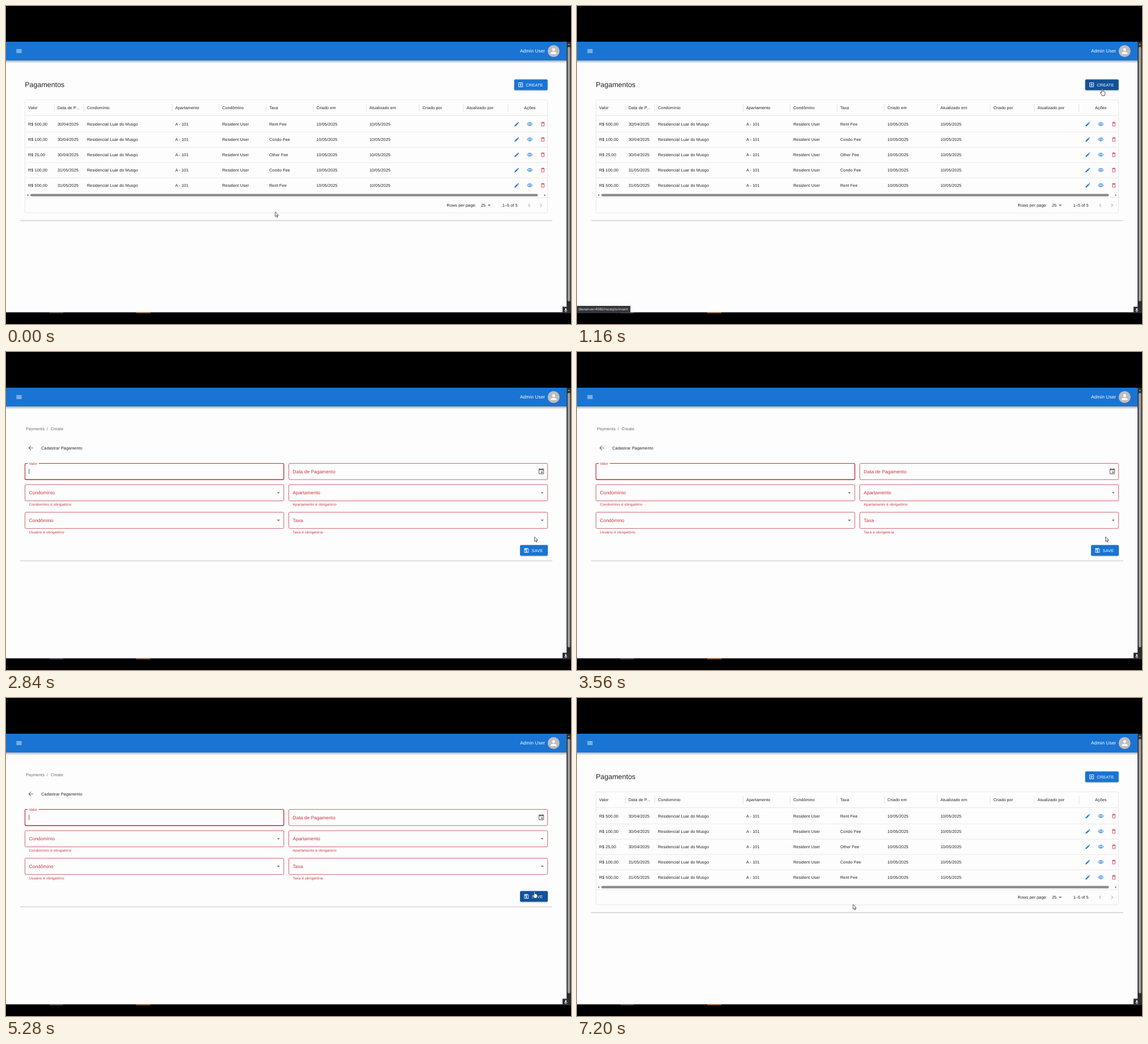
An HTML page for the animation above (7280 ms loop, 998 by 561 pixels).

```html
<!DOCTYPE html>
<html lang="pt">
<head>
<meta charset="utf-8">
<title>Pagamentos</title>
<style>
html, body { margin: 0; width: 100%; height: 100%; overflow: hidden; background: #000; }
svg { display: block; width: 100vw; height: 100vh; }
text { font-family: "Liberation Sans", Arial, sans-serif; white-space: pre; text-rendering: geometricPrecision; }
</style>
</head>
<body>
<svg id="stage" viewBox="0 0 998 561"></svg>
<script>
const LOOP = 7280;
const BLUE = '#1974d3', BLUE_DARK = '#11529a', RED = '#c62f35', INK = '#232323', GREY = '#6b6b6b';
const BODY = 7.28, LARGE = 8.32, SMALL = 6.24;

// Moments of the story, in ms
const OPEN_FORM = 1560, SUBMIT = 2840, BLUR = 6480, BACK = 6720;
const LINK_ON = 880, LINK_OFF = 1720;

const ICONS = {
  menu: 'M3 18h18v-2H3v2zm0-5h18v-2H3v2zm0-7v2h18V6H3z',
  person: 'M12 12c2.2 0 4-1.8 4-4s-1.8-4-4-4-4 1.8-4 4 1.8 4 4 4zm0 2c-2.7 0-8 1.3-8 4v2h16v-2c0-2.7-5.3-4-8-4z',
  add: 'M19 3H5a2 2 0 0 0-2 2v14a2 2 0 0 0 2 2h14a2 2 0 0 0 2-2V5a2 2 0 0 0-2-2zm0 16H5V5h14v14zm-8-2h2v-4h4v-2h-4V7h-2v4H7v2h4z',
  save: 'M17 3H5a2 2 0 0 0-2 2v14a2 2 0 0 0 2 2h14a2 2 0 0 0 2-2V7l-4-4zm2 16H5V5h11.2L19 7.8V19zm-7-7a3 3 0 1 0 0 6 3 3 0 0 0 0-6zM6 6h9v4H6z',
  edit: 'M3 17.2V21h3.8L17.8 9.9l-3.7-3.7L3 17.2zM20.7 7a1 1 0 0 0 0-1.4l-2.3-2.3a1 1 0 0 0-1.4 0l-1.9 1.8 3.8 3.8L20.7 7z',
  view: 'M12 4C7 4 2.7 7.1 1 11.5 2.7 15.9 7 19 12 19s9.3-3.1 11-7.5C21.3 7.1 17 4 12 4zm0 2c3.8 0 7.2 2.1 8.8 5.5-1.6 3.4-5 5.5-8.8 5.5s-7.2-2.1-8.8-5.5C4.8 8.1 8.2 6 12 6zm0 1a4.5 4.5 0 1 0 0 9 4.5 4.5 0 0 0 0-9zm0 2a2.5 2.5 0 1 1 0 5 2.5 2.5 0 0 1 0-5z',
  remove: 'M6 19a2 2 0 0 0 2 2h8a2 2 0 0 0 2-2V7H6v12zM8 9h8v10H8V9zm7.5-5l-1-1h-5l-1 1H5v2h14V4z',
  date: 'M17 12h-5v5h5v-5zM16 1v2H8V1H6v2H5a2 2 0 0 0-2 2v14a2 2 0 0 0 2 2h14a2 2 0 0 0 2-2V5a2 2 0 0 0-2-2h-1V1h-2zm3 18H5V8h14v11z',
  back: 'M20 11H7.8l5.6-5.6L12 4l-8 8 8 8 1.4-1.4L7.8 13H20z',
  prev: 'M15.4 7.4 14 6l-6 6 6 6 1.4-1.4-4.6-4.6z',
  next: 'M10 6 8.6 7.4l4.6 4.6-4.6 4.6L10 18l6-6z',
  down: 'M7 10l5 5 5-5z',
  mic: 'M12 14a3 3 0 0 0 3-3V5a3 3 0 0 0-6 0v6a3 3 0 0 0 3 3zm5-3a5 5 0 0 1-10 0H5a7 7 0 0 0 6 6.9V21h2v-3.1a7 7 0 0 0 6-6.9z'
};

const rect = (x, y, w, h, fill, extra = '') =>
  `<rect x="${x}" y="${y}" width="${w}" height="${h}" fill="${fill}" ${extra}/>`;
const path = (d, extra) => `<path d="${d}" ${extra}/>`;
const line = (d, color, width = 1) => path(d, `fill="none" stroke="${color}" stroke-width="${width}"`);
const icon = (name, cx, cy, fill, size = 12.48) =>
  path(ICONS[name], `fill="${fill}" fill-rule="evenodd" transform="translate(${cx - size / 2} ${cy - size / 2}) scale(${size / 24})"`);
// Text is placed by its left edge and vertical centre
const label = (x, cy, str, size = BODY, fill = INK, spacing = 0.078, extra = '') =>
  `<text x="${x}" y="${cy + size * 0.36}" font-size="${size}" fill="${fill}" letter-spacing="${spacing}" ${extra}>${str}</text>`;
const group = (id, body) => `<g id="${id}">${body}</g>`;

function button(id, x, y, w, name, str) {
  return rect(x, y + 1, w, 19.2, '#000', 'rx="2" opacity=".2" filter="url(#soft)"') +
    rect(x, y, w, 19.2, BLUE, `id="${id}" rx="2"`) +
    icon(name, x + 11.3, y + 9.6, '#fff', 10.4) +
    label(x + 20.6, y + 9.6, str, BODY, '#fff', 0.2);
}

const cardEdge = y => rect(25, y, 940, 1, '#c2c2c4') + rect(26, y + 1, 938, 1, '#e9e9eb');

function shell() {
  return rect(0, 63, 990.5, 477.5, '#fdfdfe') +
    rect(0, 96, 990.5, 5, 'url(#barShade)') +
    rect(0, 63, 990.5, 33, BLUE) +
    icon('menu', 23, 79.5, '#fff') +
    label(908, 79, 'Admin User', LARGE, '#fff') +
    '<circle cx="967.3" cy="79.5" r="10.5" fill="#bdbdbd"/>' + icon('person', 967.3, 79.5, '#fff', 15.6) +
    rect(990.5, 63, 7.5, 478.5, '#2b2b2b') + rect(992, 72, 4.6, 449, '#9d9d9f', 'rx="2.3"') +
    path('M992.2 68.8h4l-2-2.8z', 'fill="#9d9d9f"') +
    rect(0, 540.4, 998, 1.6, '#292936') +
    rect(77, 540.6, 24, 1.2, '#77777c') + rect(230, 540.6, 25, 1.2, '#d9843f') +
    rect(983, 530.5, 11, 11, '#303034') + icon('mic', 988.8, 536.8, '#eee', 9);
}

function listView() {
  const columns = [[39, 'Valor'], [91, 'Data de P...'], [143, 'Condomínio'], [299, 'Apartamento'],
    [382, 'Condômino'], [465, 'Taxa'], [548.3, 'Criado em'], [642, 'Atualizado em'],
    [735.5, 'Criado por'], [813.5, 'Atualizado por'], [915, 'Ações']];
  const rows = [['500,00', '30/04/2025', 'Rent'], ['100,00', '30/04/2025', 'Condo'], ['25,00', '30/04/2025', 'Other'],
    ['100,00', '31/05/2025', 'Condo'], ['500,00', '31/05/2025', 'Rent']];
  const rule = '#e8e8ea';
  let out = label(33.3, 139, 'Pagamentos', 12.48, INK, 0) +
    button('create', 897.7, 129.4, 59, 'add', 'CREATE') +
    rect(33.5, 165.5, 923, 199.5, 'none', `rx="2" stroke="${rule}"`) +
    line('M34 193.5H956M34 338H956', rule);
  columns.forEach(([x, name], i) => {
    out += label(x, 179.3, name);
    if (i) out += line(`M${i < 10 ? x - 5.6 : 886.5} 172.5v14`, '#dfdfe1', 0.9);
  });
  rows.forEach(([value, due, fee], i) => {
    const cy = 208.4 + i * 27;
    const cells = ['R$ ' + value, due, 'Residencial Luar do Musgo', 'A - 101', 'Resident User', fee + ' Fee', '10/05/2025', '10/05/2025'];
    cells.forEach((cell, c) => out += label(columns[c][0], cy, cell));
    out += icon('edit', 902.2, cy, BLUE, 10.4) + icon('view', 925.2, cy, BLUE, 10.4) + icon('remove', 948.2, cy, '#d33338', 10.4);
    if (i < 4) out += line(`M34 ${cy + 13.6}H956`, rule);
  });
  return out + rect(43, 331.4, 896.5, 4.4, '#8b8b8d', 'rx="2.2"') +
    path('M39.3 331.8v4l-2.4-2zM950.6 331.8v4l2.4-2z', 'fill="#6d6d6d"') +
    label(778.6, 351.4, 'Rows per page:') + label(839, 351.4, '25') + icon('down', 853.5, 351.6, GREY) +
    label(876.8, 351.4, '1–5 of 5') +
    icon('prev', 924.2, 351.6, '#b4b4b4') + icon('next', 945, 351.6, '#b4b4b4') + cardEdge(377.8);
}

function formView(failed) {
  const edge = failed ? '#c74a51' : '#c3c3c5', ink = failed ? RED : GREY;
  const rowY = failed ? [196.5, 234, 282.7] : [196.5, 234, 271.3];
  const box = (x, y, color = edge, width = 0.85) =>
    rect(x, y, 457.2, 28.6, 'none', `rx="2" stroke="${color}" stroke-width="${width}"`);
  const select = (x, row, name, error) => {
    const y = rowY[row];
    return box(x, y) + label(x + 7.1, y + 14, name, LARGE, ink) + icon('down', x + 447.7, y + 14.2, GREY) +
      (failed ? label(x + 7.1, y + 35, error, SMALL, RED, 0.208) : '');
  };
  const valueLabel = rect(38.3, 194, 19.7, 5, '#fdfdfe') + label(40.6, 196.4, 'Valor', SMALL, ink, 0.06);
  const focus = failed
    ? group('focus', box(33.5, 196.5, '#bd2a31', 1.15) + valueLabel) + rect(40.4, 206.2, 0.8, 9, '#333', 'id="caret"')
    : '';
  return box(33.5, 196.5) + valueLabel + focus +
    box(499.5, 196.5) + label(506.6, 210.7, 'Data de Pagamento', LARGE, ink) + icon('date', 945.5, 210.7, GREY) +
    select(33.5, 1, 'Condomínio', 'Condomínio é obrigatório') +
    select(499.5, 1, 'Apartamento', 'Apartamento é obrigatório') +
    select(33.5, 2, 'Condômino', 'Usuário é obrigatório') +
    select(499.5, 2, 'Taxa', 'Taxa é obrigatória') +
    button(failed ? 'saveFailed' : 'save', 908, failed ? 340.4 : 316.8, 49, 'save', 'SAVE') +
    cardEdge(failed ? 367.6 : 343.8);
}

function formHeading() {
  return label(35.2, 135.8, 'Payments', BODY, GREY) + label(72, 135.8, '/', BODY, GREY) + label(79, 135.8, 'Create', BODY, GREY) +
    '<circle id="backHover" cx="43.7" cy="169.3" r="10.4" fill="#000" opacity=".045"/>' +
    icon('back', 43.7, 169.3, GREY) + label(62.2, 169.2, 'Cadastrar Pagamento');
}

const outline = 'fill="#fff" stroke="#222" stroke-width=".75" stroke-linejoin="round"';
const arrow = path('M0 0V8.3L1.9 6.6 3.2 9.5 4.5 8.9 3.2 6.1H5.7Z', outline);
const hand = path('M-.9 1a.9.9 0 0 1 1.8 0V4.4C1.2 3.9 2.2 4 2.3 4.8 2.7 4.3 3.6 4.5 3.7 5.3 4.2 4.9 5 5.2 5 6V8.5L4.2 10.4V12H-.6V10.8L-3.2 7.5C-4 6.4-2.8 5.6-2.1 6.3L-.9 7.4Z', outline);

document.getElementById('stage').innerHTML =
  `<defs><filter id="soft" x="-20%" y="-40%" width="140%" height="180%"><feGaussianBlur stdDeviation="1"/></filter>
  <linearGradient id="barShade" x2="0" y2="1"><stop stop-color="#000" stop-opacity=".32"/><stop offset="1" stop-color="#000" stop-opacity="0"/></linearGradient></defs>` +
  rect(0, 0, 998, 561, '#000') + shell() + group('list', listView()) +
  group('form', formHeading() + group('blank', formView(false)) + group('failed', formView(true))) +
  group('link', rect(0, 529, 94.3, 12.4, '#35363a', 'rx="1"') +
    label(2.4, 535, 'devserver:4080/receipts/insert', 6.2, '#f2f2f2', 0, 'style="font-family:\'Open Sans\',sans-serif"')) +
  group('pointer', group('arrow', arrow) + group('hand', hand));

const el = {};
document.querySelectorAll('[id]').forEach(node => el[node.id] = node);
const show = (id, on) => el[id].setAttribute('display', on ? 'inline' : 'none');

// Pointer stops: time, x, y
const STOPS = [[0, 475.6, 363.2], [80, 475.6, 363.2], [840, 927.7, 146.2], [1580, 927.7, 146.2], [2060, 898, 177],
  [2120, 898, 177], [2640, 933.6, 326], [4500, 933.6, 326], [5040, 933.5, 341.2], [5400, 933.5, 341.2],
  [6240, 43.6, 169.4], [6720, 43.6, 169.4], [7200, 487.7, 364.4], [LOOP, 487.7, 364.4]];

function pointerAt(t) {
  const i = STOPS.findIndex(stop => stop[0] > t);
  const [t0, x0, y0] = STOPS[i - 1], [t1, x1, y1] = STOPS[i];
  const p = (t - t0) / (t1 - t0), k = p * p * (3 - 2 * p);
  return [x0 + (x1 - x0) * k, y0 + (y1 - y0) * k];
}

function render(t) {
  const onForm = t >= OPEN_FORM && t < BACK, failed = t >= SUBMIT;
  const [x, y] = pointerAt(t);
  const within = (left, top, w, h) => x >= left && x <= left + w && y >= top && y <= top + h;
  const hover = {
    create: !onForm && within(897.7, 129.4, 59, 19.2),
    save: onForm && !failed && within(908, 316.8, 49, 19.2),
    saveFailed: onForm && failed && within(908, 340.4, 49, 19.2)
  };
  const overBack = onForm && Math.hypot(x - 43.7, y - 169.3) < 10.4;
  const focused = t < BLUR;

  show('list', !onForm);
  show('form', onForm);
  show('blank', !failed);
  show('failed', failed);
  show('focus', focused);
  show('caret', focused && (t - SUBMIT) % 1000 < 500);
  show('link', t >= LINK_ON && t < LINK_OFF);
  show('backHover', overBack);
  for (const id in hover) el[id].setAttribute('fill', hover[id] ? BLUE_DARK : BLUE);

  const clickable = overBack || Object.values(hover).some(Boolean);
  show('hand', clickable);
  show('arrow', !clickable);
  el.pointer.setAttribute('transform', `translate(${x} ${y})`);
}

const start = performance.now();
function tick() {
  render((performance.now() - start) % LOOP);
  requestAnimationFrame(tick);
}
tick();
</script>
</body>
</html>
```
